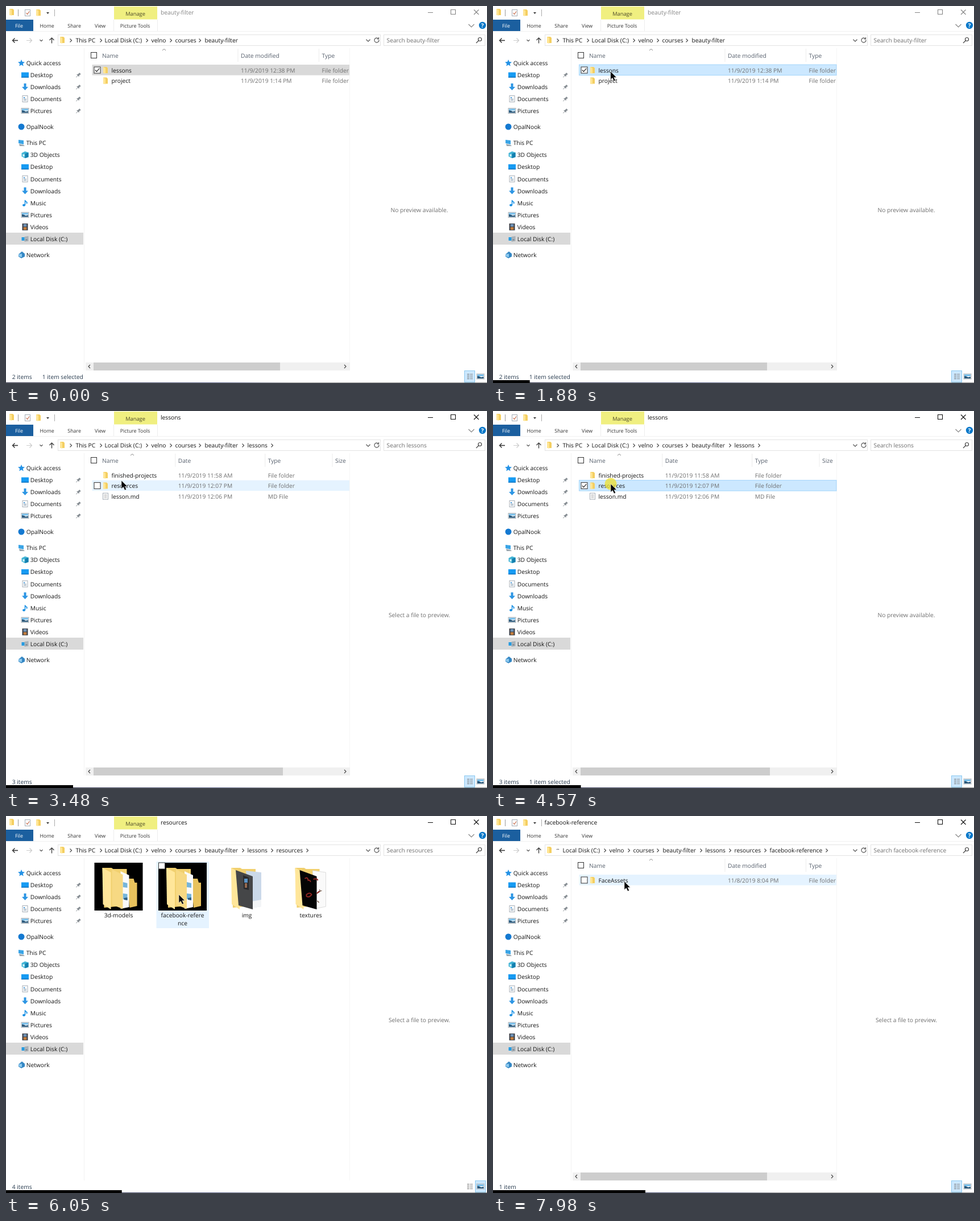
Recreate the animation shown at these times as an HTML page. Size 846 by 662 pixels, loop 8000 ms.

```html
<!DOCTYPE html>
<html lang="en">
<head>
<meta charset="utf-8">
<title>File browser</title>
<style>
html, body { margin: 0; width: 100%; height: 100%; overflow: hidden; background: #fff; }
svg { display: block; width: 100%; height: 100%; }
text { font: 10.25px "Open Sans", "Noto Sans", sans-serif; fill: #151515; text-rendering: geometricPrecision; white-space: pre; }
.ribbon { font-size: 8.9px; fill: #333; }
.dim { fill: #6f6f6f; }
.head { fill: #58616e; }
.mid { text-anchor: middle; }
.line { fill: none; stroke: #555; stroke-width: 1.2; }
.box { fill: #fff; stroke: #333; stroke-width: 1; }
.item .mark, .item .check { visibility: hidden; }
.item .back { fill: none; }
.hover .back { fill: #e5f3ff; }
.sel .back { fill: #cce8ff; }
.sel.hover .back { stroke: #a4d5fb; }
.idle.sel:not(.hover) .back { fill: #d9d9d9; }
.hover .mark, .sel .mark, .sel .check { visibility: visible; }
</style>
</head>
<body>
<svg id="stage" viewBox="0 0 846 662" preserveAspectRatio="none"></svg>
<script>
const LOOP = 8000;

// Drawing helpers
const rect = (x, y, w, h, fill, extra = '') => `<rect x="${x}" y="${y}" width="${w}" height="${h}" fill="${fill}" ${extra}/>`;
const shape = (d, fill, extra = '') => `<path d="${d}" fill="${fill}" ${extra}/>`;
const stroke = (d, color = '#555', width = 1.2) => `<path class="line" d="${d}" style="stroke:${color};stroke-width:${width}"/>`;
const text = (x, y, value, cls = '', extra = '') => `<text x="${x}" y="${y}" class="${cls}" ${extra}>${value}</text>`;
const at = (x, y, body) => `<g transform="translate(${x} ${y})">${body}</g>`;
const chevron = (x, y) => stroke(`M${x - 1.5} ${y - 3}l3 3l-3 3`, '#444', 1.1);
const down = (x, y, r = 3.5, color = '#555') => stroke(`M${x - r} ${y - r / 2}l${r} ${r}l${r} ${-r}`, color);
const folder = (x, y) => at(x, y, shape('M0 0h6l2 2v9h-8z', '#f4cf62') + shape('M0 0l4 2v10l-4-1.5z', '#ffe594'));
const checkbox = (x, y) => `<g class="mark"><rect class="box" x="${x}" y="${y}" width="11" height="11"/></g>`
  + `<path class="line check" d="M${x + 2} ${y + 5.5}l2.5 2.7l4.7-5.5" style="stroke:#222"/>`;

const page = rect(-4.5, -5.5, 9, 11, '#fff', 'stroke="#a5adb5"');
const icons = {
  star: shape('M0-6l1.7 4 4.3.4-3.3 2.8 1 4.3L0 3.2l-3.7 2.3 1-4.3L-6-1.6l4.3-.4z', '#2492e6'),
  desktop: rect(-6.5, -4.5, 13, 9, '#169bf3') + rect(-6.5, 3.3, 13, 1.4, '#0b70bd'),
  download: shape('M-2-6h4v6h3.5L0 6l-5.5-6H-2z', '#2d96e4'),
  document: page + rect(-2.5, -3, 2, 2, '#3c91d5') + rect(-2.5, 0, 5, 1, '#8097ab') + rect(-2.5, 2.2, 5, 1, '#8097ab'),
  picture: rect(-6.5, -4.5, 13, 9, '#f5f8fa', 'stroke="#a6adb3"') + rect(-5.5, -3.5, 11, 3, '#74bdea')
    + shape('M-5.5 3.5v-4.5l4 1 2.5 1.5 4.500-1v3z', '#28577a'),
  cloud: '<circle r="5.500" fill="#1479d1"/>',
  computer: shape('M-5-5l9 1v7l-9-2z', '#3aa4e6') + shape('M-4 2l8 2 2 2h-9z', '#9ba7b0'),
  cube: shape('M-6-3L0-6l6 2v8l-6 2-6-3z', '#42b4d5') + shape('M0-2l6-2v8l-6 2z', '#147fae') + rect(-4, -1, 3, 4, '#d2f3fa'),
  music: '<ellipse cx="-2" cy="4" rx="2.500" ry="2" fill="#168ee3"/>' + stroke('M0 4v-9q0 2.500 3 3.500q1 2-.5 3', '#168ee3', 1.5),
  video: rect(-5, -6, 10, 12, '#3e4148') + rect(-2.8, -5, 5.6, 4.500, '#6f93b8') + rect(-2.8, .5, 5.6, 4.500, '#c57e3d'),
  disk: shape('M-1-4l7-1v9l-7 1z', '#aab1b7') + rect(1, 1, 3, 1.2, '#66717a') + rect(-6, -3, 5, 6, '#259be1'),
  network: shape('M-5-1L1-6l5 4v5l-6 3-5-3z', '#3487c4') + shape('M-5-1l6-1v6l-5-1z', '#8dc9ee'),
};
const pin = shape('M1-4l3 3-2 .5-1.500 2 0 2-2-2-3 3-.5-.5 3-3-2-2h2l2-1.500z', '#858c92');

// Side panel: label, y, icon, child, pinned
const places = [
  ['Quick access', 100, 'star'],
  ['Desktop', 121, 'desktop', 1, 1], ['Downloads', 142, 'download', 1, 1],
  ['Documents', 163, 'document', 1, 1], ['Pictures', 184, 'picture', 1, 1],
  ['OpalNook', 212, 'cloud'], ['This PC', 240, 'computer'],
  ...[['3D Objects', 'cube'], ['Desktop', 'desktop'], ['Documents', 'document'], ['Downloads', 'download'],
    ['Music', 'music'], ['Pictures', 'picture'], ['Videos', 'video'], ['Local Disk (C:)', 'disk']]
    .map(([name, icon], i) => [name, 261.3 + i * 21.1, icon, 1]),
  ['Network', 437, 'network'],
];
const sidebar = rect(0, 398, 136, 21, '#d9d9d9') + rect(137, 74, 1, 566, '#f3f3f3')
  + places.map(([name, y, icon, child, pinned]) =>
    at(child ? 33.5 : 27, y, icons[icon]) + text(child ? 42.7 : 35.7, y + 4, name) + (pinned ? at(128, y, pin) : '')).join('');

const chrome = folder(6, 5) + rect(21, 6, 1, 12, '#999')
  + at(38, 12, page + stroke('M-2.5 0l2 2.500l3.500-5', '#c46b4c')) + folder(53, 6)
  + shape('M71 11h5l-2.500 3z', '#333') + rect(85, 6, 1, 12, '#aaa')
  + rect(0, 24, 48, 20, '#1b5f9f') + text(16, 38, 'File', 'ribbon', 'style="fill:#fff"')
  + text(59.500, 38, 'Home', 'ribbon') + text(108.3, 38, 'Share', 'ribbon') + text(156, 38, 'View', 'ribbon')
  + rect(0, 44, 846, 1, '#f1f1f1') + down(818.5, 34.5, 5, '#888')
  + '<circle cx="838" cy="34" r="6.2" fill="#0878c9"/>' + text(838, 37.5, '?', 'mid', 'style="fill:#fff;font-weight:bold"')
  + stroke('M21 60.500H11.500m4-4l-4 4l4 4', '#333', 1.4) + stroke('M36 60.500h9.500m-4-4l4 4l-4 4', '#ccc')
  + down(62, 60.500, 2.500) + stroke('M80.500 65.500V56m-4 4l4-4l4 4', '#444', 1.4)
  + rect(91.500, 50.500, 567, 19, 'none', 'stroke="#e3e3e3"') + rect(664.5, 50.500, 178, 19, 'none', 'stroke="#e3e3e3"')
  + folder(95, 54) + down(637, 60.500) + stroke('M654.5 57a4 4 0 1 0 1.400 2.500M655.5 55v3h-3', '#555')
  + stroke('M831 61l-4 4M836.500 58.500a3 3 0 1 1-6 0a3 3 0 1 1 6 0', '#444');

const manage = rect(190, 1, 76, 22.500, '#f0ef80') + text(227.5, 17, 'Manage', 'mid', 'style="font-size:9.3px;fill:#4c4a28"')
  + rect(189, 24, 1, 20, '#eee') + rect(266, 24, 1, 20, '#eee') + text(227, 38, 'Picture Tools', 'ribbon mid');

const controls = stroke('M742 11.500h9M782.5 6.500h8v8h-8zM823 6.500l8.500 8.500m0-8.500l-8.500 8.500', 'inherit', 1.1);

const listIcon = [0, 1, 2, 3].map(i => rect(811, 646 + i * 2.7, 4, 1, '#777') + rect(816, 646 + i * 2.7, 5, 1, '#8c8c8c')).join('');
const viewButtons = tiles => rect(tiles ? 825.5 : 806.5, 640.500, 18, 20, '#cce8ff', 'stroke="#8cc9ef"')
  + listIcon + at(834.5, 650.500, icons.picture);

// Address bar
const crumbs = [['This PC', 123, 114], ['Local Disk (C:)', 174, 167], ['velno', 256, 248], ['courses', 298, 290],
  ['beauty-filter', 350, 341], ['lessons', 425, 417], ['resources', 476, 468], ['facebook-reference', 538, 530]];
function address(depth, tail) {
  const shift = depth > 7 ? -51 : 0;
  const shown = crumbs.slice(shift ? 1 : 0, depth);
  return shown.map(([name, x, arrow], i) =>
    (shift && !i ? stroke('M112 59l1.500-1m1-0l1.500 1', '#555') : chevron(arrow + shift, 60.500))
    + text(x + shift - .5, 64, name)).join('') + (tail ? chevron(tail, 60.500) : '');
}

// Detail lists
function details(key, columns, rows, caret, thumb) {
  const header = `<rect class="box" x="149.500" y="81.500" width="10" height="10"/>` + text(169, 91, 'Name', 'head')
    + columns.map(([name, x]) => rect(x - 5.5, 75, 1, 23, '#ececec') + text(x, 91, name, 'head')).join('')
    + stroke(`M${caret - 3} 78l3-2.500l3 2.500`, '#888', 1);
  const body = rows.map(([name, ...cells], i) => {
    const y = 103 + i * 18.600;
    const icon = name.endsWith('.md')
      ? at(175, y + 9.5, page + [-3, -.5, 2].map(v => rect(-2.500, v, 5, 1, '#aaa')).join('')) : folder(171, y + 4);
    return `<g class="item" id="${key}${i}"><rect class="back" x="151.500" y="${y}" width="452.500" height="18.600"/>`
      + checkbox(155, y + 4) + icon + text(185.5, y + 13.700, name)
      + cells.map((cell, c) => text(columns[c][1], y + 13.700, cell, 'dim')).join('') + '</g>';
  }).join('');
  const scroll = rect(140, 626, 465, 14, '#f0f0f0') + rect(154, 626, thumb, 14, '#cdcdcd')
    + stroke('M148 630l-3 3l3 3M595 630l3 3l-3 3', '#444');
  return header + body + scroll;
}

// Tiles
const bigBack = shape('M0 1h16l3 2h24v64l-40 4z', '#f1d06f');
const bigFront = (cover) => shape('M0 1l15 8v65l-14-9z', '#ffe69a') + cover;
const yellowFolder = rect(-14, -8, 85, 84, '#000') + bigBack
  + shape('M43 20h12l2 7h4v41l-13 3z', '#e8c25d') + shape('M32 7l15 7v56l-15 3z', '#fafafa')
  + shape('M36 26l8 2v8l-8-1zM36 46l8 1v10l-8-1z', '#76b5da') + shape('M38 54l6-1v5l-6-1z', '#315e80')
  + shape('M17 4l19 9v60l-19-7z', '#f7d983') + bigFront('');
const darkCover = color => shape('M8 5l30 11v58l-25-7z', color);
const imageFolder = bigBack + shape('M26 6l27 3v60l-20 3z', '#cbd9e9') + shape('M36 60l17-3v12l-17 3z', '#f3f5f7')
  + bigFront(darkCover('#454648') + shape('M21 14l10 4v22l-9-2z', '#292a2d') + rect(23, 20, 6, 7, '#5c93c4') + rect(24, 28, 4, 8, '#96694f'));
const textureFolder = bigBack + shape('M31 6l23 3v60l-20 4z', '#fafafa', 'stroke="#ddd"')
  + stroke('M40 45l4-3l-1-3m1 3l3-1m-8 18l3 3', '#6b4a3a')
  + bigFront(darkCover('#050505') + stroke('M17 20q5-4 6 3q4-1 4 3m5-5q6-2 8 2M20 48q6-5 9 0q-4 6-9 3zm18-2l5-4', '#8e2522', 2));
const tileList = [[198, 'yellow', ['3d-models']], [310.5, 'yellow', ['facebook-refere', 'nce']], [423.5, 'image', ['img']], [536, 'texture', ['textures']]];
const art = { yellow: yellowFolder, image: imageFolder, texture: textureFolder };
const tiles = key => tileList.map(([cx, kind, label], i) =>
  `<g class="item" id="${key}${i}"><rect class="back" x="${cx - 46}" y="80" width="92.500" height="${label[1] ? 117 : 104}"/>`
  + at(cx - (kind === 'yellow' ? 28.500 : 27.500), 90, art[kind]) + checkbox(cx - 42, 82)
  + label.map((line, n) => text(cx, 178 + n * 14, line, 'mid')).join('') + '</g>').join('');

const wide = [['Date modified', 413], ['Type', 555.5]];
const views = [
  { start: 0, name: 'beauty-filter', count: 2, depth: 5, tail: 0, pick: [0, 0],
    body: details('a', wide, [['lessons', '11/9/2019 12:38 PM', 'File folder'], ['project', '11/9/2019 1:14 PM', 'File folder']], 278, 328) },
  { start: 3150, name: 'lessons', count: 3, depth: 6, tail: 468, pick: [4270, 1],
    body: details('b', [['Date', 302.7], ['Type', 460.7], ['Size', 579]], [['finished-projects', '11/9/2019 11:58 AM', 'File folder'],
      ['resources', '11/9/2019 12:07 PM', 'File folder'], ['lesson.md', '11/9/2019 12:06 PM', 'MD File']], 222, 333) },
  { start: 4780, name: 'resources', count: 4, depth: 7, tail: 530, pick: [6250, 1], tiled: true, body: tiles('c') },
  { start: 6570, name: 'facebook-reference', count: 1, depth: 8, tail: 587, pick: [LOOP, 0],
    body: details('d', wide, [['FaceAssets', '11/8/2019 8:04 PM', 'File folder']], 278, 328) },
];

const stage = document.getElementById('stage');
stage.innerHTML = `<defs><linearGradient id="edge"><stop offset="0" stop-color="#25253a"/><stop offset=".45" stop-color="#5c6488"/>
  <stop offset=".6" stop-color="#9a9a9a"/><stop offset="1" stop-color="#8a8a8a"/></linearGradient></defs>`
  + rect(0, 0, 846, 662, '#fff') + chrome + sidebar + rect(604, 74, 1, 566, '#f6f6f6')
  + views.map((v, i) => `<g id="view${i}">${v.body}${address(v.depth, v.tail)}${viewButtons(v.tiled)}${v.name[0] === 'f' ? '' : manage}`
    + text(669.5, 64, 'Search ' + v.name, 'dim') + text(10.700, 655, `${v.count} item${v.count > 1 ? 's' : ''}`, '', 'style="fill:#26394d"') + '</g>').join('')
  + text(272, 15.300, '', '', 'id="title"') + `<g id="controls">${controls}</g>`
  + text(727, 362, '', 'dim mid', 'id="preview"') + text(63.700, 655, '1 item selected', '', 'id="picked" style="fill:#26394d"')
  + rect(0, 661, 846, 1, 'url(#edge)') + rect(0, 657, 0, 5, '#000', 'id="progress"')
  + '<circle id="click" r="10.500" fill="#eee02c" fill-opacity=".75"/>'
  + '<path id="cursor" d="M0 0V14.500L3.300 11.400L6 17L8.600 15.800L6 10.500H10.500Z" fill="#080808" stroke="#fff" stroke-width=".5"/>';

const get = id => document.getElementById(id);
const show = (el, on) => { el.style.display = on ? '' : 'none'; };

const runs = [[80, 880, 9], [980, 1780, 9], [1880, 2580, 8], [2720, 3480, 8], [3580, 4380, 9],
  [4470, 5220, 8], [5320, 6050, 8], [6150, 6880, 8], [6980, 7780, 9], [7880, 7980, 2]];
function snap(t) {
  const run = runs.findLast(r => t >= r[0]);
  if (!run) return 0;
  const [start, end, steps] = run, gap = (end - start) / (steps - 1);
  return start + gap * Math.min(steps - 1, Math.floor((t - start) / gap + .1));
}

const path = [[0, 800, 690], [180, 722, 640], [380, 630, 600], [580, 545, 560], [680, 490, 523], [880, 390, 451], [980, 287, 384],
  [1180, 190, 225], [1380, 190, 157], [1680, 203, 118], [2000, 209, 113], [2500, 206, 115], [2850, 202, 115], [3480, 203, 122],
  [4100, 207, 128], [4577, 207, 128], [5220, 205, 130], [6050, 304, 138], [6880, 302, 139], [7600, 236, 118], [7880, 231, 115], [LOOP, 231, 115]];
function pointer(t) {
  const i = path.findIndex(p => p[0] > t), [t0, x0, y0] = path[i - 1], [t1, x1, y1] = path[i];
  const k = (t - t0) / (t1 - t0);
  return [x0 + (x1 - x0) * k, y0 + (y1 - y0) * k];
}
const clicks = [[2700, 2800], [2920, 3030], [4270, 4380], [4470, 4680], [6250, 6330], [6450, 6540]];

function draw(now) {
  const t = snap(now % LOOP), [x, y] = pointer(t);
  const index = views.findLastIndex(v => t >= v.start), view = views[index];
  const active = t >= 2720, picked = t >= view.pick[0];
  views.forEach((v, i) => show(get('view' + i), i === index));
  for (let i = 0; i < view.count; i++) {
    const over = view.tiled ? Math.abs(x - tileList[i][0]) < 46 && y < 197
      : x > 151 && x < 604 && Math.floor((y - 103) / 18.6 + .01) === i;
    const sel = picked && view.pick[1] === i;
    get('abcd'[index] + i).setAttribute('class', `item${over ? ' hover' : ''}${sel ? ' sel' : ''}${active ? '' : ' idle'}`);
  }
  const title = get('title');
  title.textContent = view.name;
  title.setAttribute('x', index === 3 ? 90.5 : 272);
  title.style.fill = active ? '#111' : '#858585';
  get('controls').style.stroke = active ? '#111' : '#858585';
  get('preview').textContent = picked ? 'No preview available.' : 'Select a file to preview.';
  show(get('picked'), picked);
  get('progress').setAttribute('width', t ? 2 + t / 30 : 0);
  for (const id of ['cursor', 'click']) get(id).setAttribute('transform', `translate(${x} ${y})`);
  show(get('click'), clicks.some(([from, to]) => t >= from && t < to));
}

function tick() {
  draw(performance.now());
  requestAnimationFrame(tick);
}
tick();
</script>
</body>
</html>
```
